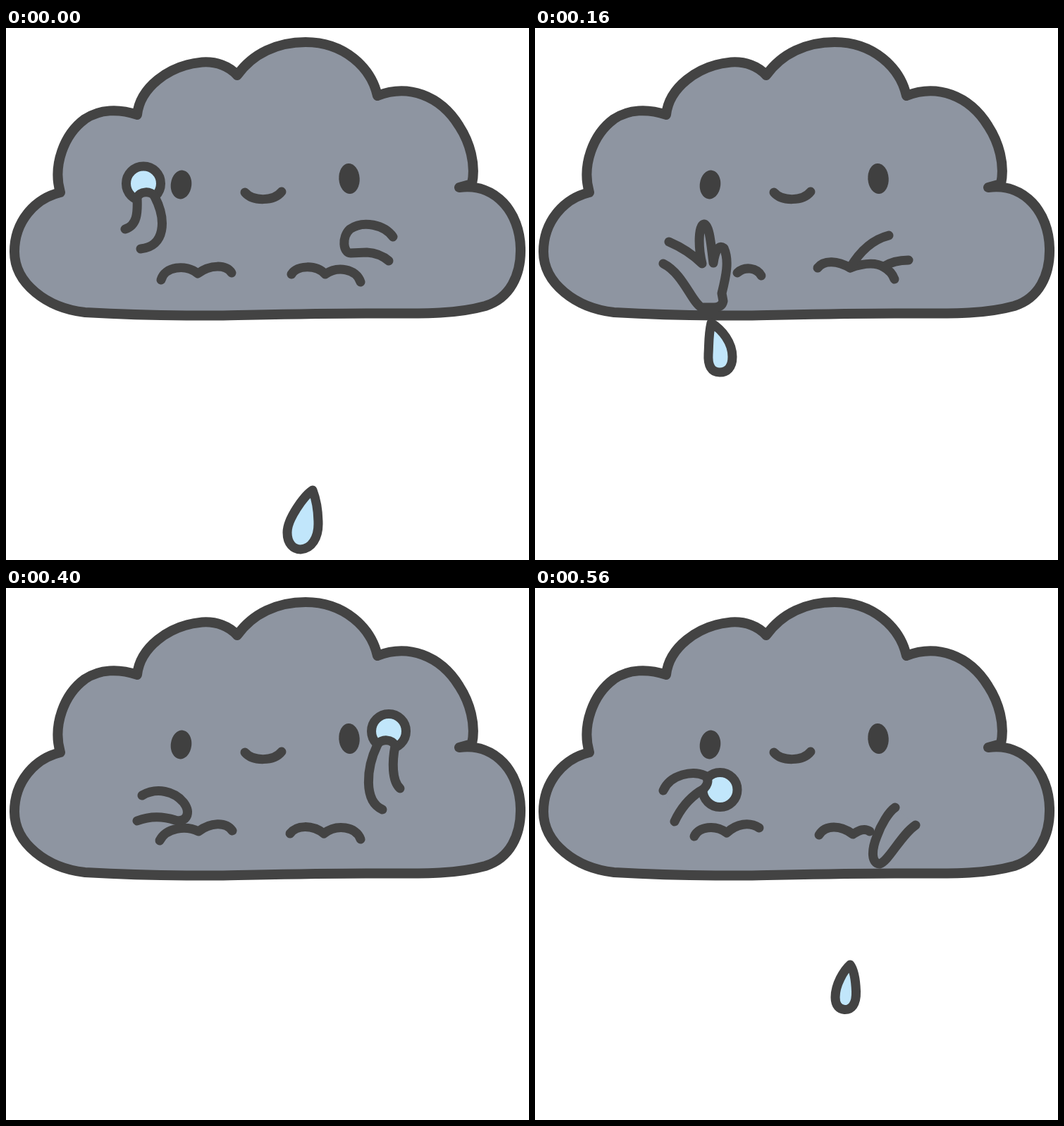
These frames come from a looping animation (742x754 px, 0.64 s). An HTML page:

```html
<!DOCTYPE html>
<html lang="en">
<head>
<meta charset="utf-8">
<title>Juggling cloud</title>
<style>
  html, body { margin: 0; width: 100%; height: 100%; overflow: hidden; background: #fff; }
  svg { display: block; width: 100%; height: 100%; }
  path, circle { stroke: #434343; stroke-width: 13; stroke-linecap: round; stroke-linejoin: round; }
  .cloud { fill: #8e95a1; stroke-width: 14; }
  .line { fill: none; }
  .arm { fill: #8e95a1; }
  .water { fill: #c1e6fb; }
  .eye { fill: #404040; }
</style>
</head>
<body>
<svg viewBox="0 0 742 754">
  <path class="cloud" d="M77 233 C40 242 12 275 12 317 C12 362 58 397 112 403
    C165 406 230 408 300 407.5 C380 406 460 404 530 404.5 C600 405 640 405 680 394
    C715 383 731 350 730 312 C729 262 695 219 643 226 L661 221
    C667 193 658 162 643 139 C616 95 570 79 527 96 C518 56 480 20 425 20
    C385 20 350 36 328 67 C317 54 298 47 278 48.500 C230 53 190 85 186 123
    C160 114 133 115 112 129 C82 151 66 195 77 233Z"/>
  <ellipse class="eye" cx="248.500" cy="222" rx="14.700" ry="20.500" transform="rotate(7 248.500 222)"/>
  <ellipse class="eye" cx="487" cy="213.500" rx="14.700" ry="21.500" transform="rotate(-4 487 213.500)"/>
  <path class="line" d="M339 233 C350 246 380 246 391 232"/>
  <g id="juggler"></g>
</svg>
<script>
const POSE_MS = 80;
const MIRROR = 'matrix(-1, 0, 0, 1, 724, 0)';

// Half a cycle: the left hand throws while the right one reaches for the next ball.
const poses = [
  {
    lines: ['M220 357 C225 338 255 334 272 348 C290 335 312 335 320 347',
            'M405 349 C413 336 440 335 453 349 C470 337 497 341 503 360'],
    ball: [195, 220.5],
    arms: ['M169 285 C186 280 187 262 186 241 C189 231 206 230 211 239 C228 272 226 310 191 313',
           'M549 296 C537 279 507 272 488 285 C476 296 478 319 489 319 L512 318 Q530 319 543 330'],
    drop: 'M435 655 C424 662 399 695 399 715 C399 731 408 739 418 739 C434 738 443 722 443 703 C443 685 440 668 435 655Z'
  },
  {
    lines: ['M221 356 C227 338 255 334 273 348 C290 335 312 336 321 348',
            'M403 344 C412 331 434 332 451 345 C469 336 497 340 506 358'],
    ball: [181, 203],
    arms: ['M165 284 C177 273 176 245 172 224 C175 214 192 213 197 222 C213 255 217 302 190 314',
           'M531 294 C510 282 485 288 472 304 C461 319 468 333 484 329 Q512 320 538 330']
  },
  {
    lines: ['M287 347 C298 337 315 340 321 351',
            'M401 340 C410 328 430 330 447 340 C467 333 484 332 495 339 Q506 345 510 356'],
    arms: ['M190 303 Q218 315 237 334 C231 308 232 279 240 278 C248 279 250 311 253 333 C256 313 261 307 268 312 C276 330 271 352 265 376 L267 387 Q265 396 254 396 L236 396 C222 388 210 348 182 334',
           'M447 340 C460 318 478 300 502 294',
           'M495 338 Q509 329 530 329'],
    drop: 'M250 418 C266 428 280 446 280 466 C280 482 272 488 262 488 C250 488 245 478 246 462 C247 448 246 435 250 418Z'
  },
  {
    lines: ['M249 345 C258 339 266 345 273 349 C290 336 312 335 321 350',
            'M406 340 C420 331 438 334 452 347 C468 335 492 338 498 352'],
    ball: [461.5, 286],
    arms: ['M184 336 C205 350 222 387 235 391 C247 390 247 372 239 352 C233 335 222 317 213 311',
           'M542 287 C532 264 500 258 483 266 C475 272 480 283 490 288 C508 300 520 318 526 331'],
    drop: 'M277 534 C286 542 298 562 298 580 C298 592 292 597 285 597.5 C275 598 268 590 268.5 572 C269 558 271 542 277 534Z'
  }
];

function add(parent, tag, attrs = {}) {
  const node = document.createElementNS('http://www.w3.org/2000/svg', tag);
  for (const [name, value] of Object.entries(attrs)) node.setAttribute(name, value);
  return parent.appendChild(node);
}

function loop(node, frames, duration) {
  node.animate(frames.map(frame => ({ easing: 'step-end', ...frame })),
    { duration, iterations: Infinity }).startTime = 0;
}

const juggler = document.getElementById('juggler');
const halfCycle = poses.length * POSE_MS;

poses.forEach(({ lines, ball, arms, drop }, i) => {
  const group = add(juggler, 'g');
  const draw = (d, kind) => add(group, 'path', { d, class: kind });
  lines.forEach(d => draw(d, 'line'));
  if (ball) add(group, 'circle', { cx: ball[0], cy: ball[1], r: 24.5, class: 'water' });
  arms.forEach(d => draw(d, 'arm'));
  if (drop) draw(drop, 'water');

  const shown = poses.map((_, k) => ({ opacity: +(k === i), offset: k / poses.length }));
  loop(group, [...shown, { opacity: 0, offset: 1 }], halfCycle);
});

// The second half repeats the first with the hands swapped.
loop(juggler, [
  { transform: 'matrix(1, 0, 0, 1, 0, 0)', offset: 0 },
  { transform: MIRROR, offset: 0.5 },
  { transform: MIRROR, offset: 1 }
], halfCycle * 2);
</script>
</body>
</html>
```
